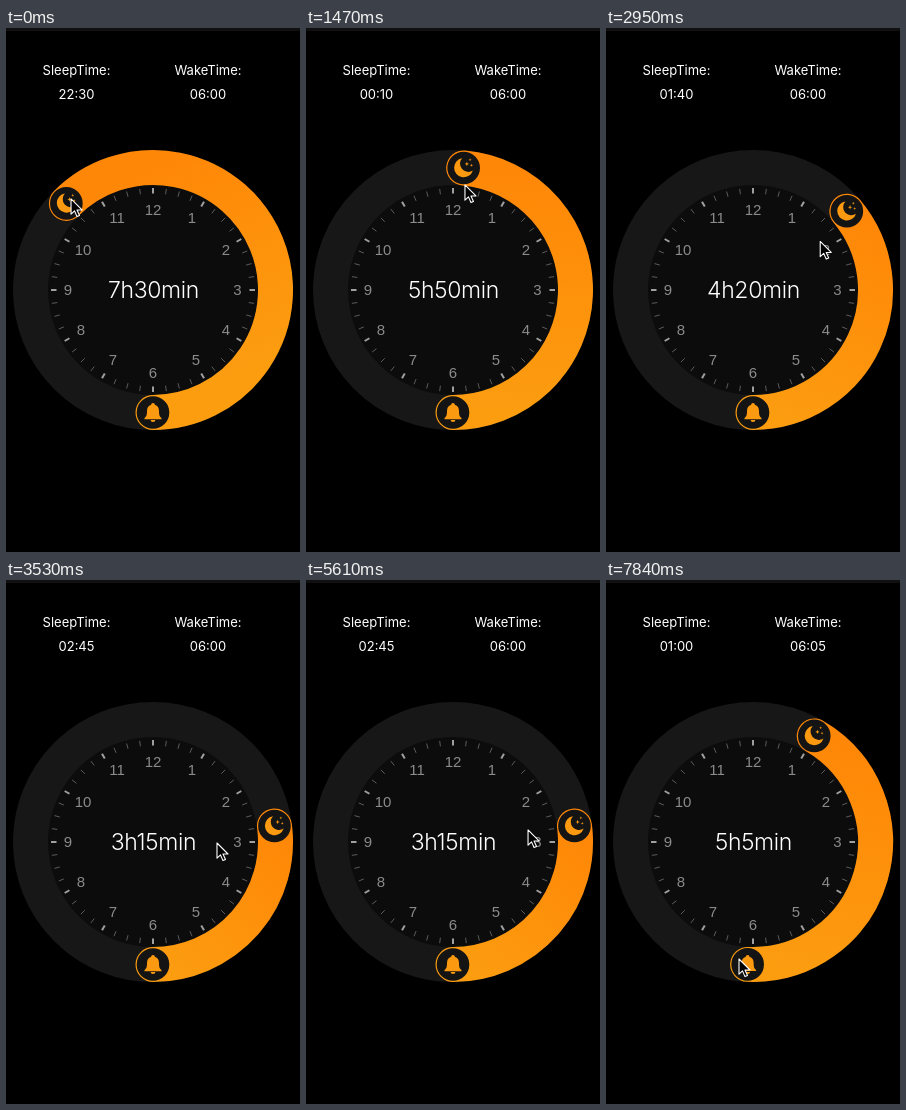
An HTML page that plays this animation: 294 by 524 pixels, repeating every 7990 ms.

```html
<!DOCTYPE html>
<html lang="en">
<head>
<meta charset="utf-8">
<title>Sleep dial</title>
<style>
html, body { margin: 0; width: 100%; height: 100%; overflow: hidden; background: #000; }
svg { display: block; width: 294px; height: 524px; }
text { text-anchor: middle; fill: #fff; font-family: Inter, "Open Sans", sans-serif; }
.label { font-size: 13px; }
.total { font-size: 23px; font-weight: 300; letter-spacing: -.35px; }
.hour { font: 15px "Liberation Sans", Arial, sans-serif; fill: #8b8b8b; }
.knob { fill: #141414; }
.icon { fill: #fb9a10; }
</style>
</head>
<body>
<svg viewBox="0 0 294 524">
  <defs>
    <linearGradient id="glow" gradientUnits="userSpaceOnUse">
      <stop offset="0" stop-color="#ff8707"/>
      <stop offset="1" stop-color="#fc9d10"/>
    </linearGradient>
  </defs>
  <rect width="294" height="524"/>
  <rect width="294" height="3" fill="#101010"/>
  <text class="label" x="70.5" y="47">SleepTime:</text>
  <text class="label" x="202" y="47">WakeTime:</text>
  <text class="label" id="sleep" x="70.5" y="70.5"></text>
  <text class="label" id="wake" x="202" y="70.5"></text>
  <circle cx="147" cy="262" r="122.5" fill="#0c0c0c" stroke="#171717" stroke-width="35"/>
  <path id="arc" fill="none" stroke="url(#glow)" stroke-width="35" stroke-linecap="round"/>
  <g id="dial"></g>
  <text class="total" id="total" x="147.5" y="269.7"></text>
  <g id="bell">
    <circle class="knob" r="16.3"/>
    <path class="icon" d="M0-9.5c1.2 0 1.8.8 1.8 1.8 3 .9 4.2 3.3 4.2 6.2 0 4 .6 5.4 2.5 7v1.2h-17v-1.2c1.9-1.6 2.5-3 2.5-7 0-2.9 1.2-5.3 4.2-6.2 0-1 .6-1.8 1.8-1.8zM-2.4 7.6h4.8a2.4 2 0 0 1-4.8 0z"/>
  </g>
  <g id="moon">
    <circle class="knob" r="16.3"/>
    <path class="icon" d="M-1.5-9.8A9.6 9.6 0 1 0 9.2 2.5 8.2 8.2 0 0 1-1.5-9.8z"/>
    <path class="icon" d="M3.2-6.2l.6 1.6 1.6.6-1.6.6-.6 1.6-.6-1.6-1.6-.6 1.6-.6zM6.4-9.6l.4 1.1 1.1.4-1.1.4-.4 1.1-.4-1.1-1.1-.4 1.1-.4zM7.8-4.2l.4 1.1 1.1.4-1.1.4-.4 1.1-.4-1.1-1.1-.4 1.1-.4z"/>
  </g>
  <path id="cursor" d="M0 0V15.2L3.5 11.9 6 17.6 8.5 16.5 6 11H11z" fill="#000" stroke="#fff" stroke-width="1.1" stroke-linejoin="round"/>
</svg>
<script>
const LOOP = 7990, CX = 147, CY = 262, R = 122.5;
const $ = id => document.getElementById(id);

// Bedtime in minutes after midnight: [first change, last change, values]
const bedtime = [
  [0, 0, [-90]],
  [150, 880, [-85, -75, -55, -35, -20, -5]],
  [1180, 2060, [0, 5, 10, 20, 30, 40, 50]],
  [2360, 3390, [55, 60, 70, 85, 100, 120, 135, 150]],
  [3530, 4430, [165, 180, 200, 215, 230, 240, 245]],
  [4870, 5910, [240, 230, 215, 195, 180, 165, 150, 130]],
  [6060, 6650, [110, 90, 75, 65, 60]]
];
// Pointer while dragging: [time, degrees ahead of the moon, radius]
const drag = [
  [0, 3, 122.5], [1470, 1.5, 105.7], [2360, 0, 101.5], [3530, 8.4, 64],
  [4430, .9, 63.5], [5610, -1.6, 76], [6650, 1, 113]
];
// Pointer on its way to the bell
const travel = [
  [6950, 7540, [[201, 183], [177, 257], [146, 328], [131, 366], [137, 382]]],
  [7840, 7840, [[133, 379]]]
];

const steps = groups => groups.flatMap(([from, to, values]) =>
  values.map((value, i) => ({
    t: Math.floor((from + (to - from) * i / Math.max(1, values.length - 1)) / 10) * 10,
    value
  })));
const bedSteps = steps(bedtime), travelSteps = steps(travel);
const at = (list, t) => list.findLast(s => s.t <= t);

const polar = (deg, r) => {
  const a = deg * Math.PI / 180;
  return [CX + r * Math.sin(a), CY - r * Math.cos(a)];
};

function dragPoint(step) {
  const i = Math.max(1, drag.findIndex(k => k[0] >= step.t));
  const [a, b] = [drag[i - 1], drag[i]];
  const p = (step.t - a[0]) / (b[0] - a[0]);
  const mix = n => a[n] + (b[n] - a[n]) * p;
  return polar(step.value / 2 + mix(1), mix(2));
}

function add(name, attrs, text = "") {
  const el = document.createElementNS("http://www.w3.org/2000/svg", name);
  for (const key in attrs) el.setAttribute(key, attrs[key]);
  el.textContent = text;
  $("dial").append(el);
}

function buildDial() {
  for (let i = 0; i < 48; i++) {
    const major = i % 4 === 0;
    const [x1, y1] = polar(i * 7.5, 96.5), [x2, y2] = polar(i * 7.5, 102);
    add("line", { x1, y1, x2, y2, stroke: major ? "#a0a0a0" : "#5c5c5c", "stroke-width": major ? 2 : 1 });
  }
  const spots = [
    [186, 190], [220, 222], [231.5, 262], [220, 302], [190, 332], [147, 345],
    [107, 332], [75, 302], [62, 262], [77, 222], [111, 190], [147, 182]
  ];
  spots.forEach(([x, y], i) => add("text", { class: "hour", x, y: y + 5.3 }, i + 1));
}

const pad = n => String(n).padStart(2, "0");
const clock = m => {
  const n = (m + 1440) % 1440;
  return pad(Math.floor(n / 60)) + ":" + pad(n % 60);
};
const place = (id, [x, y]) => $(id).setAttribute("transform", `translate(${x} ${y})`);

function draw(t) {
  const step = at(bedSteps, t), bed = step.value;
  const wake = t >= 7840 ? 365 : 360, span = wake - bed;
  const a = polar(bed / 2, R), b = polar(wake / 2, R);

  $("sleep").textContent = clock(bed);
  $("wake").textContent = clock(wake);
  $("total").textContent = Math.floor(span / 60) + "h" + span % 60 + "min";

  $("arc").setAttribute("d", `M${a}A${R} ${R} 0 ${span > 360 ? 1 : 0} 1 ${b}`);
  ["x1", "y1", "x2", "y2"].forEach((key, i) => $("glow").setAttribute(key, [...a, ...b][i]));
  place("moon", a);
  place("bell", b);

  const way = at(travelSteps, t);
  place("cursor", way ? way.value : dragPoint(step));
}

buildDial();
const start = performance.now();
function tick(now) {
  draw(Math.max(0, now - start) % LOOP);
  requestAnimationFrame(tick);
}
draw(0);
requestAnimationFrame(tick);
</script>
</body>
</html>
```
